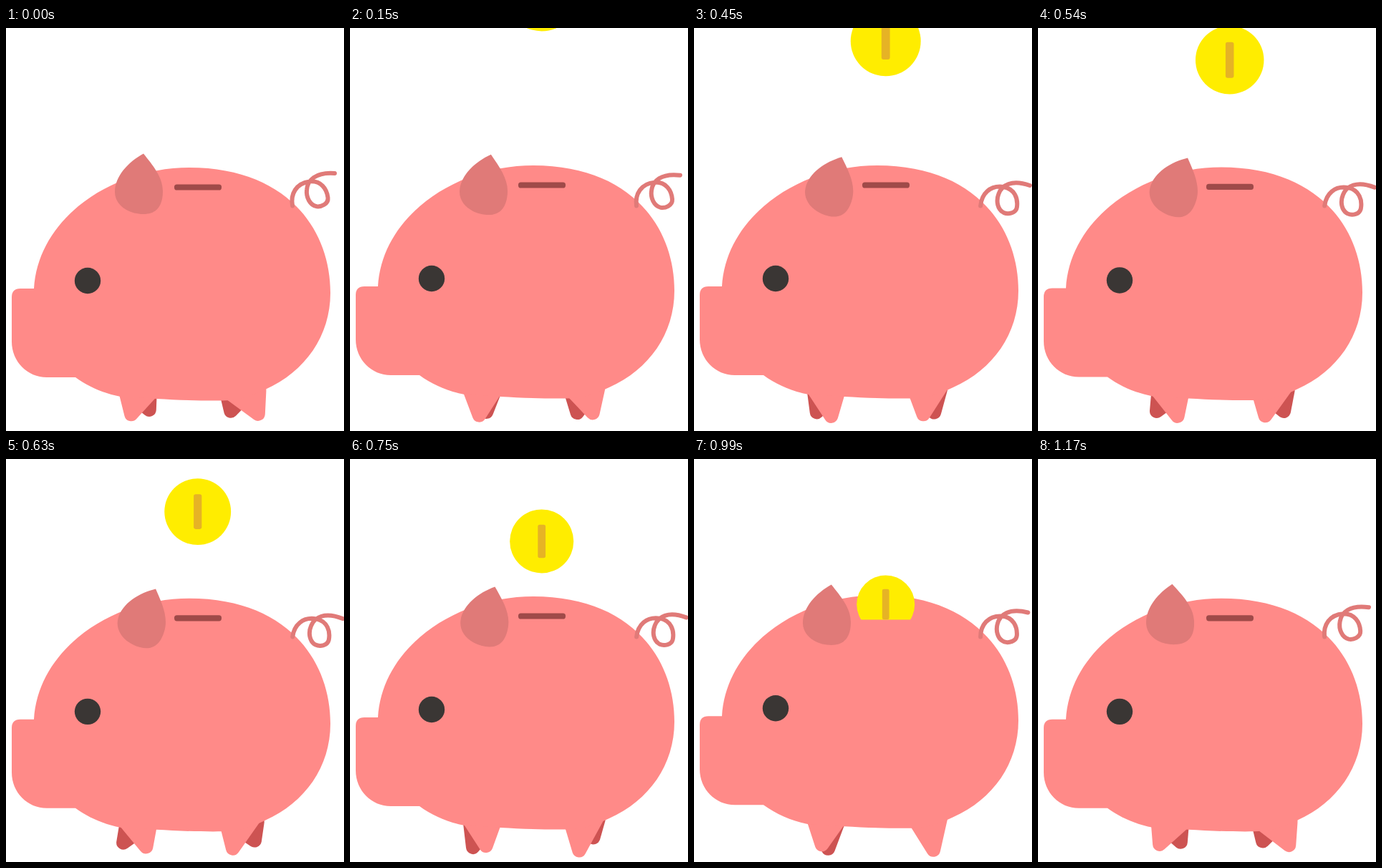
An HTML page for the animation above (1200 ms loop, 472 px wide and 563 px high).

```html
<!DOCTYPE html>
<html lang="en">
<head>
<meta charset="utf-8">
<title>Piggy bank</title>
<style>
  html, body { margin: 0; width: 100%; height: 100%; overflow: hidden; background: #fff; }
  svg { display: block; width: 472px; height: 563px; }
  .skin { fill: #ff8a88; }
  .far { fill: #cd5352; }
  .ear { fill: #e07a78; }
  .tail { fill: none; stroke: #e07a78; stroke-width: 6; stroke-linecap: round; stroke-linejoin: round; }
</style>
</head>
<body>
<svg viewBox="0 0 472 563">
  <clipPath id="aboveSlot"><rect width="472" height="224.5"/></clipPath>
  <path id="farFront" class="far"/>
  <path id="farBack" class="far"/>
  <path id="nearFront" class="skin"/>
  <path id="nearBack" class="skin"/>
  <g id="body">
    <path class="skin" d="M39 364C45 264 150 195 256 195C391 195 453 280 453 370
      C453 430 418 480 362 505C345 513 330 519 314 520C290 521.5 245 520 210 518
      L160 515C135 510 115 501 97 488H57C30 488 8 466 8 438V376Q8 364 20 364Z"/>
    <rect x="235" y="218.4" width="66" height="8.2" rx="3.6" fill="#9f4a49"/>
    <circle cx="114" cy="353" r="18.2" fill="#3a3634"/>
  </g>
  <path id="tail" class="tail" d="M400 248.5C397 232 405 217 424 214.5C440 213 448 225 449.5 237
    C450.5 246 440 250 434 249.3C424 247.5 419 236 420 226C421 213 432 201 459 203"/>
  <path id="ear" class="ear" d="M192 175.5C171 187 152 207 152 229C152 247 170 260 192 260
    C210 260 219 249 219 228C219 208 205 192 192 175.5Z"/>
  <g clip-path="url(#aboveSlot)">
    <g id="coin">
      <circle r="1" fill="#ffed00"/>
      <rect x="-.121" y="-.523" width=".242" height="1.046" rx=".06" fill="#e6b325"/>
    </g>
  </g>
</svg>
<script>
const LOOP = 1200, HALF = LOOP / 2, STEP = 30, FOOT = 9.8;

const linear = u => u;
const easeIn = u => u ** 1.7;
const easeOut = u => 1 - (1 - u) ** 1.6;
const easeInOut = u => (1 - Math.cos(Math.PI * u)) / 2;

// Goes from a to b in the first half of the loop and from b to c in the second
function swing(t, [a, b, c], up = linear, down = linear) {
  return t < HALF ? a + (b - a) * up(t / HALF) : b + (c - b) * down(t / HALF - 1);
}

// x and y: foot path, dip: extra arc of the foot in each half
const legs = {
  farFront: { x: [200, 162, 201], y: [533, 534, 533], dip: [4, 12] },
  farBack: { x: [314, 349, 312], y: [535, 534, 535], dip: [3.5, -8], up: easeIn, back: true },
  nearFront: { x: [175, 197, 168.5], y: [539.5, 542, 538], dip: [1, -1] },
  nearBack: { x: [352, 316.5, 353.5], y: [539, 543, 538], dip: [-3.5, 7], up: easeOut, down: easeIn, back: true }
};

const el = id => document.getElementById(id);
const move = (id, transform) => el(id).setAttribute("transform", transform);

// Where the line from (px, py) touches the round foot
function touch(px, py, x, y, side) {
  const dx = px - x, dy = py - y;
  const a = Math.atan2(dy, dx) + side * Math.acos(FOOT / Math.hypot(dx, dy));
  return `${x + FOOT * Math.cos(a)} ${y + FOOT * Math.sin(a)}`;
}

// A leg tapers from two hip points to a round foot
function legPath({ x: xs, y: ys, dip, up, down, back }, t, bob) {
  const arc = Math.sin(Math.PI * (t % HALF) / HALF);
  const x = swing(t, xs, up, down);
  const y = swing(t, ys) + dip[t < HALF ? 0 : 1] * arc;
  const ax = back ? 298.5 : 158, ay = 512 + bob;
  const bx = back ? 354 + Math.max(0, x - 335) * 0.55 : 210.5;
  const by = (back ? 508 : 515) + bob;
  return `M${ax} ${ay}L${touch(ax, ay, x, y, -1)}A${FOOT} ${FOOT} 0 0 0 ${touch(bx, by, x, y, 1)}`
    + `L${bx} ${by}V${by - 20}H${ax}Z`;
}

function draw(t) {
  const bob = -6 * easeInOut(2 * t / HALF);
  move("body", `translate(0 ${bob})`);
  for (const id in legs) el(id).setAttribute("d", legPath(legs[id], t, bob));
  move("ear", `rotate(${swing(t, [0, 16.7, -4], linear, easeOut)} 178 243)`);
  move("tail", `rotate(${swing(t, [0, 17.7, 2.7], easeInOut, easeIn)} 400 249)`);

  const y = 192 - 263 * Math.cos(0.213 + 0.001414 * t);
  move("coin", `translate(267.7 ${y}) scale(${49.8 - y * 0.0457})`);
}

const start = performance.now();
function tick() {
  const t = Math.max(0, performance.now() - start) % LOOP;
  draw(Math.floor(t / STEP) * STEP);
  requestAnimationFrame(tick);
}
tick();
</script>
</body>
</html>
```
